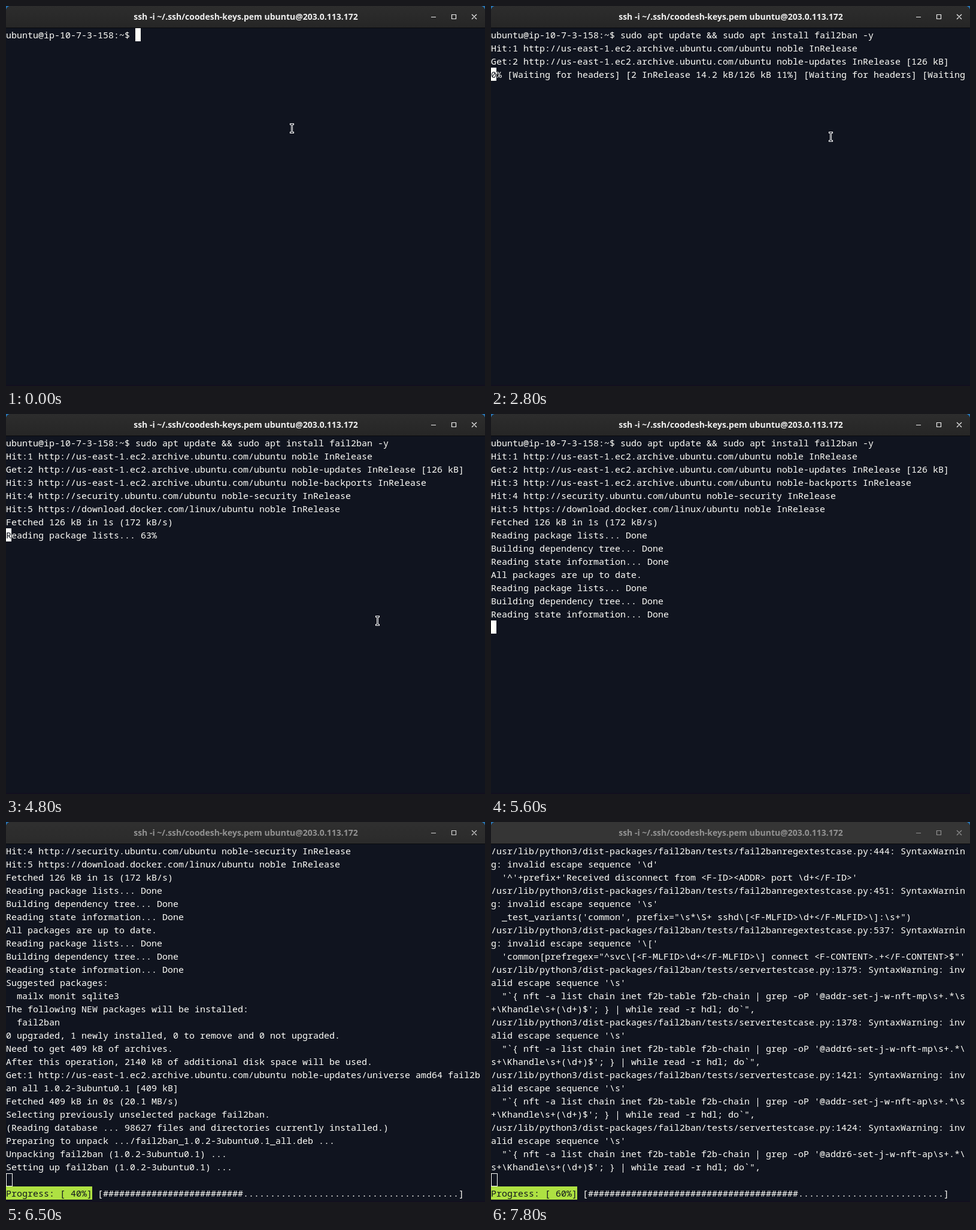
An HTML page for the animation above (8 s loop, 800 by 635 pixels).

```html
<!DOCTYPE html>
<html lang="en">
<head>
<meta charset="utf-8">
<title>Terminal</title>
<style>
  html, body { margin: 0; width: 100%; height: 100%; overflow: hidden; background: #2a78b8; }
  #win { position: absolute; left: 0; top: 0; width: 800px; height: 635px; overflow: hidden;
    border-radius: 8px 8px 0 0; background: #10141f; }
  #bar { position: absolute; width: 800px; height: 36px; border-bottom: 1px solid #090a0d;
    background: linear-gradient(#2d2d2d, #262626); }
  #dim { position: absolute; inset: 0; background: #353535; }
  #title { position: absolute; left: 0; width: 801px; line-height: 36px; text-align: center;
    font: bold 14px/36px "Noto Sans", sans-serif; white-space: pre; }
  #buttons { position: absolute; left: 0; top: 0; fill: none; stroke-width: 1.2; }
  #term, #cursor, #progress { position: absolute; margin: 0; white-space: pre; color: #fffffa;
    font: 15px/22px "Noto Sans Mono", monospace; font-variant-ligatures: none; }
  #term { left: 0; top: 37px; }
  #cursor { height: 22px; min-width: 9px; box-sizing: border-box; background: #fffffa; color: #10141f; }
  #cursor.hollow { background: none; border: 1px solid #fffffa; }
  #progress { left: 0; top: 609px; }
  #label { display: inline-block; background: #aee142; color: #10141f; }
  #edge { position: absolute; top: 633px; width: 800px; height: 2px; background: #120f1f; }
  #mouse { position: absolute; left: 0; top: 0; overflow: visible; fill: none; stroke-linecap: square; }
</style>
</head>
<body>
<div id="win">
  <div id="bar">
    <div id="dim"></div>
    <div id="title">ssh -i ~/.ssh/coodesh-keys.pem ubuntu@203.0.113.172</div>
    <svg id="buttons" width="800" height="36">
      <path d="M710 18.5h8M744.5 14.5h7v7h-7zM778 14l8 8M786 14l-8 8"/>
    </svg>
  </div>
  <pre id="term"></pre>
  <div id="cursor"></div>
  <div id="progress"><span id="label"></span><span id="meter"></span></div>
  <div id="edge"></div>
  <svg id="mouse" width="1" height="1">
    <path id="beam" d="M-2-7H2M0-7V7M-2 7H2" stroke="#fff" stroke-width="3"/>
    <path d="M-2-7H2M0-7V7M-2 7H2" stroke="#10141f" stroke-width="1"/>
  </svg>
</div>
<script>
const LOOP = 8000, COLS = 88, ROWS = 27, CELL = 9, LINE = 22, TOP = 37;
const BLUR = 6500;
const $ = id => document.getElementById(id);

const prompt = 'ubuntu@ip-10-7-3-158:~$ ';
const command = 'sudo apt update && sudo apt install fail2ban -y';
const mirror = 'http://us-east-1.ec2.archive.ubuntu.com/ubuntu noble';
const lists = 'Reading package lists... ';
const tree = 'Building dependency tree... ';
const planning = [lists + 'Done', tree + 'Done', 'Reading state information... Done'];

const warn = (file, line, esc, code) => [
  `/usr/lib/python3/dist-packages/fail2ban/tests/${file}testcase.py:${line}: ` +
  `SyntaxWarning: invalid escape sequence '\\${esc}'`, '  ' + code];
const regex = (...args) => warn('fail2banregex', ...args);
const server = (line, set) => warn('server', line, 's',
  '"`{ nft -a list chain inet f2b-table f2b-chain | grep -oP \'@' + set +
  String.raw`\s+.*\s+\Khandle\s+(\d+)$'; } | while read -r hdl; do` + '`",');

const log = [
  prompt + command,
  `Hit:1 ${mirror} InRelease`,
  `Get:2 ${mirror}-updates InRelease [126 kB]`,
  `Hit:3 ${mirror}-backports InRelease`,
  'Hit:4 http://security.ubuntu.com/ubuntu noble-security InRelease',
  'Hit:5 https://download.docker.com/linux/ubuntu noble InRelease',
  'Fetched 126 kB in 1s (172 kB/s)',
  ...planning,
  'All packages are up to date.',
  ...planning,
  'Suggested packages:',
  '  mailx monit sqlite3',
  'The following NEW packages will be installed:',
  '  fail2ban',
  '0 upgraded, 1 newly installed, 0 to remove and 0 not upgraded.',
  'Need to get 409 kB of archives.',
  'After this operation, 2140 kB of additional disk space will be used.',
  `Get:1 ${mirror}-updates/universe amd64 fail2ban all 1.0.2-3ubuntu0.1 [409 kB]`,
  'Fetched 409 kB in 0s (20.1 MB/s)',
  'Selecting previously unselected package fail2ban.',
  '(Reading database ... 98627 files and directories currently installed.)',
  'Preparing to unpack .../fail2ban_1.0.2-3ubuntu0.1_all.deb ...',
  'Unpacking fail2ban (1.0.2-3ubuntu0.1) ...',
  'Setting up fail2ban (1.0.2-3ubuntu0.1) ...',
  ...regex(224, 's', String.raw`"1490349000 test failed.dns.ch", "^\s*test <F-ID>\S+</F-ID>"`),
  ...regex(435, 'S', String.raw`'^'+prefix+'<F-ID>User <F-USER>\S+</F-USER></F-ID> not allowed\n'`),
  ...regex(443, 'S', String.raw`'^'+prefix+'User <F-USER>\S+</F-USER> not allowed\n'`),
  ...regex(444, 'd', String.raw`'^'+prefix+'Received disconnect from <F-ID><ADDR> port \d+</F-ID>'`),
  ...regex(451, 's', String.raw`_test_variants('common', prefix="\s*\S+ sshd\[<F-MLFID>\d+</F-MLFID>\]:\s+")`),
  ...regex(537, '[', String.raw`'common[prefregex="^svc\[<F-MLFID>\d+</F-MLFID>\] connect <F-CONTENT>.+</F-CONTENT>$"'`),
  ...server(1375, 'addr-set-j-w-nft-mp'),
  ...server(1378, 'addr6-set-j-w-nft-mp'),
  ...server(1421, 'addr-set-j-w-nft-ap'),
  ...server(1424, 'addr6-set-j-w-nft-ap')
];

const fetching = '0% [Waiting for headers] [2 InRelease 14.2 kB/126 kB 11%] [Waiting for headers] [Waiting]';

// time, finished lines, current line, cursor column, cursor width, progress
const steps = [
  [0, 0, prompt, prompt.length],
  [2000, 0, prompt + command, prompt.length, command.length + 1],
  [2700, 1],
  [2800, 3, fetching.slice(0, COLS)],
  [2900, 6, '0% [Working]'],
  [3500, 7],
  [3800, 7, lists + '0%'],
  [3900, 7, lists + '4%'],
  ...[11, 22, 33, 45, 54, 63, 78, 96].map((p, i) => [4300 + i * 100, 7, `${lists}${p}%`]),
  [5100, 8, tree + '0%'],
  [5200, 11],
  [5300, 11, lists + '47%'],
  [5400, 12, tree + '0%'],
  [5600, 14],
  [5800, 21, '0% [Working]'],
  [5900, 23],
  [6300, 24, '(Reading database ... 85%', 22],
  [6400, 27, '', 0, 1, 20],
  [6500, 28, '', 0, 1, 40],
  [7300, 28, '', 0, 1, 60],
  [7600, 40, '', 0, 0, 60],
  [7800, log.length, '', 0, 1, 60]
];

// time, x, y
const moves = [
  [0, 477.5, 204.5], [100, 478.5, 203.5], [200, 479.5, 201.5],
  [600, 522.5, 209.5], [700, 567.5, 218.5],
  [4500, 569.5, 232.5], [4600, 577.5, 274.5], [4700, 596.5, 326.5], [4800, 620.5, 345.5],
  [4900, 672.5, 350.5], [5000, 728.5, 342.5], [5100, 754.5, 332.5], [5200, -50, -50]
];

const at = (table, t) => table.findLast(row => row[0] <= t);
const wrap = line => line.match(new RegExp(`.{1,${COLS}}`, 'g')) || [''];
const mix = (a, b, k) => Math.round(a + (b - a) * k);
const grey = v => `rgb(${v},${v},${v})`;

function drawScreen([, count, tail = '', col = 0, width = 1, progress = 0]) {
  const rows = [...log.slice(0, count).flatMap(wrap), tail];
  const shown = rows.slice(-(progress ? ROWS - 1 : ROWS));
  $('term').textContent = shown.join('\n');

  const cursor = $('cursor');
  cursor.style.left = col * CELL + 'px';
  cursor.style.top = TOP + (shown.length - 1) * LINE + 'px';
  cursor.style.visibility = width ? 'visible' : 'hidden';
  cursor.textContent = tail.slice(col, col + width).padEnd(width);

  $('progress').hidden = !progress;
  const size = 66, done = Math.floor(size * progress / 100);
  $('label').textContent = `Progress: [ ${progress}%]`;
  $('meter').textContent = ` [${'#'.repeat(done)}${'.'.repeat(size - done)}]`;
}

function drawFocus(t) {
  const away = t >= BLUR;
  const k = away ? Math.min(1, (t - BLUR + 60) / 200) : 0;
  $('dim').style.opacity = k;
  $('title').style.color = grey(away ? 146 : 240);
  $('buttons').style.stroke = grey(mix(240, 146, k));
  $('cursor').className = away ? 'hollow' : '';
}

let last = -1;
function draw(now) {
  const t = Math.floor(now % LOOP / 100) * 100;
  if (t !== last) {
    last = t;
    const [, x, y] = at(moves, t);
    $('mouse').style.transform = `translate(${x}px, ${y}px)`;
    drawScreen(at(steps, t));
    drawFocus(t);
  }
}

const start = performance.now();
function tick() {
  draw(performance.now() - start);
  requestAnimationFrame(tick);
}
tick();
</script>
</body>
</html>
```
